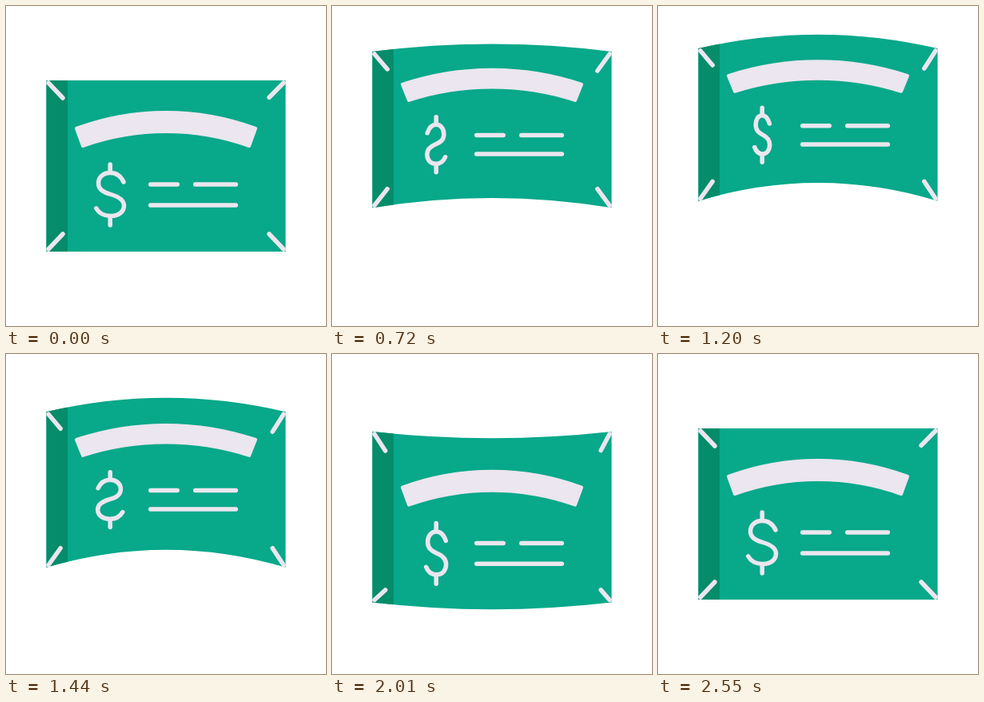
Recreate the animation shown at these times as an HTML page. Size 400x400 px, loop 4580 ms.

```html
<!DOCTYPE html>
<html lang="en">
<head>
<meta charset="utf-8">
<title>Floating banknote</title>
<style>
  html, body { margin: 0; width: 100%; height: 100%; overflow: hidden; background: #fff; }
  svg { display: block; width: 100%; height: 100%; }
  .line { fill: none; stroke: #ebe6ef; stroke-width: 5.5; stroke-linecap: round; stroke-linejoin: round; }
  .line path { vector-effect: non-scaling-stroke; }
  #banner { fill: #ebe6ef; stroke-width: 4; }
</style>
</head>
<body>
<svg viewBox="0 0 400 400">
  <clipPath id="sheet"><path id="sheetEdge"/></clipPath>
  <path id="note" fill="#08a88a"/>
  <rect x="50" width="27" height="400" fill="#058c6a" clip-path="url(#sheet)"/>
  <g id="content" class="line">
    <path id="banner" d="M88 153A324 324 0 0 1 312 153L304 175A309 309 0 0 0 96 175Z"/>
    <path d="M180.7 223H214.2M236.7 223H287.3M180.7 249H287.3"/>
    <path id="dollar" d="M130.2 198V207.5M130.2 263.5V274
      M147 220C143.5 212.5 137.5 208.5 130 208.5C121.5 208.5 115.5 214 115.5 221.5
      C115.5 230 123 233 131 235.5C139.5 238 147.5 241.5 147.5 249.5
      C147.5 257.5 140.5 262.5 131 262.5C123 262.5 116.5 259.5 112.8 253"/>
  </g>
  <path id="ticks" class="line"/>
</svg>
<script>
const LOOP = 4580, STEP = 30, END = 2550;
const LEFT = 50.5, RIGHT = 349.5, MID = 236;
const el = id => document.getElementById(id);

// Monotone cubic curve through the given points, at rest at both ends.
function curve(times, values) {
  const gap = times.slice(1).map((t, i) => t - times[i]);
  const rate = gap.map((g, i) => (values[i + 1] - values[i]) / g);
  const slope = times.map((_, i) => {
    const a = rate[i - 1], b = rate[i];
    return a * b > 0 ? 2 * a * b / (a + b) : 0;
  });
  return t => {
    let i = 0;
    while (i < gap.length - 1 && t > times[i + 1]) i++;
    const u = (t - times[i]) / gap[i], v = 1 - u;
    return values[i] * v * v * (1 + 2 * u) + values[i + 1] * u * u * (3 - 2 * u)
      + gap[i] * u * v * (slope[i] * v - slope[i + 1] * u);
  };
}

const flight = [0, 330, 540, 720, 1140, 1200, 1620, 2010, 2160, 2550];
const topEnd = curve(flight, [93, 77, 65, 57, 52.6, 53, 87.5, 97, 96, 93]);
const topMid = curve(flight, [93, 76, 59.4, 47.6, 35.4, 35.7, 74.7, 105.2, 102, 93]);
const lowEnd = curve(flight, [307, 287, 264.4, 252.3, 243, 243.7, 287.6, 310.5, 309.5, 307]);
const lowMid = curve(flight, [307, 285.3, 256.5, 240, 220.6, 221, 271, 319.2, 315.8, 307]);
const height = curve(flight, [236, 216.3, 192, 173.3, 161, 161.3, 205.6, 249.4, 245.5, 236]);
const squash = curve(flight, [1, .99, .945, .908, .892, .893, .922, .996, .998, 1]);

const sway = [0, 330, 720, 1200, 1620, 2010, 2550];
const spin = curve(sway, [0, 61, 229, 417, 578, 676, 720]);
const insetL = curve(sway, [21, 21, 19.2, 18.2, 18, 16.7, 21]);
const insetR = curve(sway, [21, 20.7, 18.2, 17.2, 16.5, 13.9, 21]);
const dropL = curve(sway, [22, 22, 22, 21, 21.3, 24, 22]);
const dropR = curve(sway, [21.3, 21.5, 24, 25, 24.7, 23.5, 21.3]);
const rise = curve(sway, [22, 21.7, 23.7, 24.3, 23.7, 15.6, 22]);

const tick = (x1, y1, x2, y2) => `M${x1} ${y1}L${x2} ${y2}`;

function draw(t) {
  const top = topEnd(t), low = lowEnd(t);
  const edge = `M${LEFT} ${top}Q200 ${2 * topMid(t) - top} ${RIGHT} ${top}`
    + `V${low}Q200 ${2 * lowMid(t) - low} ${LEFT} ${low}Z`;
  el('note').setAttribute('d', edge);
  el('sheetEdge').setAttribute('d', edge);

  el('content').setAttribute('transform',
    `translate(0 ${height(t)}) scale(1 ${squash(t)}) translate(0 ${-MID})`);
  const flip = Math.cos(spin(t) * Math.PI / 180);
  el('dollar').setAttribute('transform', `translate(130.2 0) scale(${flip} 1) translate(-130.2 0)`);

  const xl = 50 + insetL(t), xr = 350 - insetR(t), up = low - rise(t);
  el('ticks').setAttribute('d',
    tick(53, top + 3, xl, top + dropL(t)) + tick(347, top + 3, xr, top + dropR(t))
    + tick(53, low - 3, xl, up) + tick(347, low - 3, xr, up));
}

const start = performance.now();
function frame(now) {
  const t = Math.max(0, now - start) % LOOP;
  draw(Math.min(Math.floor(t / STEP) * STEP, END));
  requestAnimationFrame(frame);
}
draw(0);
requestAnimationFrame(frame);
</script>
</body>
</html>
```
